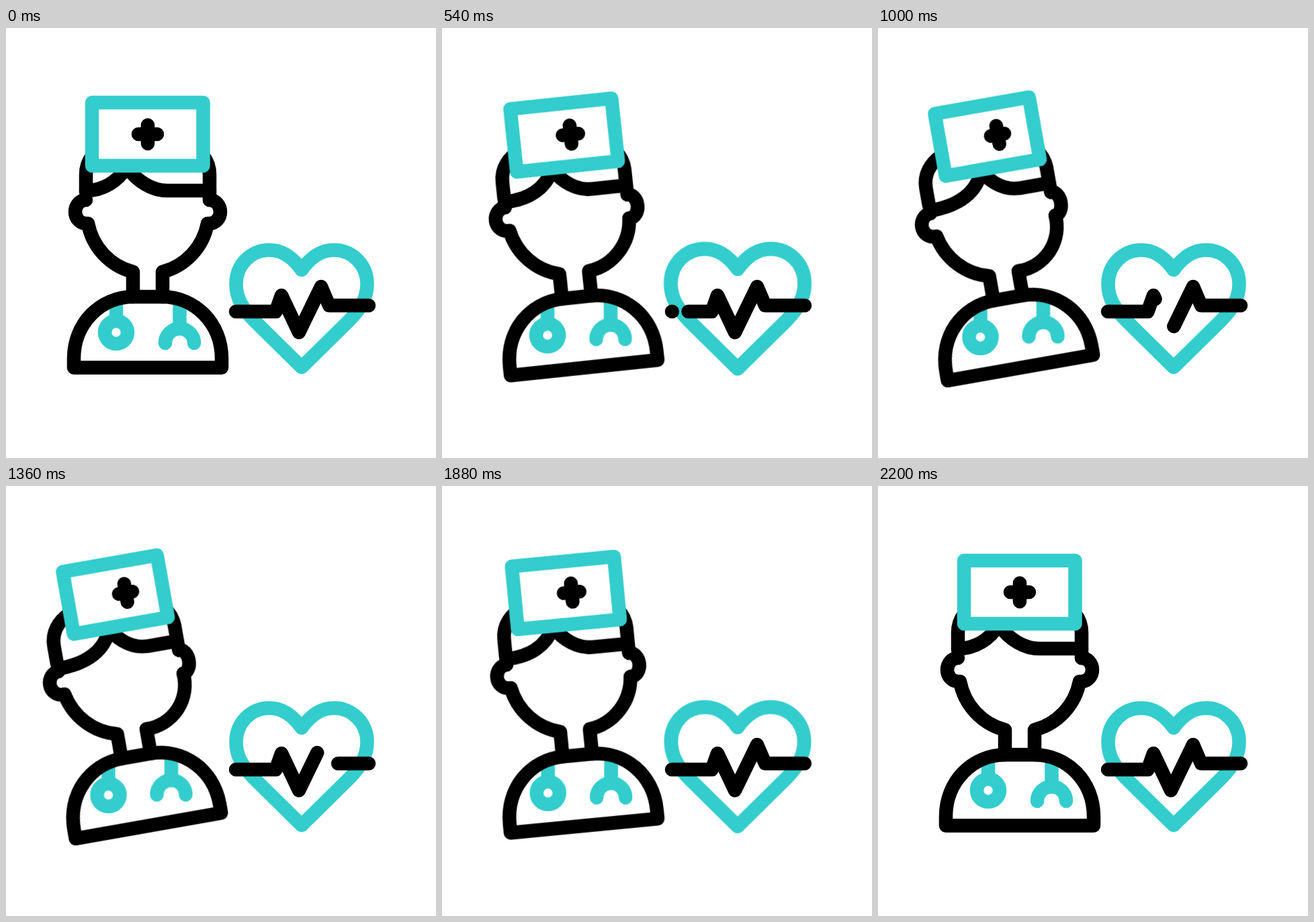
These frames come from a looping animation (640 by 640 pixels, 2400 ms). An HTML page without scripts:

```html
<!DOCTYPE html>
<html lang="en">
<head>
<meta charset="utf-8">
<title>Nurse and heartbeat</title>
<style>
  html, body { margin: 0; width: 100%; height: 100%; overflow: hidden; background: #fff; }
  svg { display: block; width: 100%; height: 100%; }
  path { fill: none; stroke: #000; stroke-width: 20.5; stroke-linecap: round; stroke-linejoin: round; }
  .teal { stroke: #33cdcd; }
  .hat { fill: #fff; }

  .move, .morph, .heart, .pulse {
    animation: 2400ms cubic-bezier(.333, 0, .667, 1) infinite;
  }
  .move { animation-name: move; transform-origin: 213px 500px; }
  .morph { d: var(--rest); animation-name: morph; }
  .heart { animation-name: beat; transform-origin: 440px 418px; }

  /* Lean out 200-800 ms, return 1600-2200 ms */
  @keyframes move {
    0%, 8.333%, 91.667%, 100% { transform: none; }
    33.333%, 66.667% { transform: var(--to); }
  }
  @keyframes morph {
    0%, 8.333%, 91.667%, 100% { d: var(--rest); }
    33.333%, 66.667% { d: var(--turn); }
  }
  @keyframes beat {
    0%, 16.667%, 41.667%, 58.333%, 83.333%, 100% { transform: scale(1); }
    29.167%, 70.833% { transform: scale(1.047); }
  }

  /* The old trace is wiped from the left while the new one follows */
  .pulse { stroke-dasharray: 100 200; }
  .wipe { animation-name: wipe, show-old; }
  .draw { animation-name: draw, show-new; }
  .wipe, .draw { animation-timing-function: cubic-bezier(.333, 0, .667, 1), step-end; }
  @keyframes wipe {
    0%, 12.5% { stroke-dashoffset: 0; }
    70.833%, 100% { stroke-dashoffset: -100; }
  }
  @keyframes draw {
    0%, 20.833% { stroke-dashoffset: 100; }
    79.167%, 100% { stroke-dashoffset: 0; }
  }
  @keyframes show-old { 0% { opacity: 1; } 70.833%, 100% { opacity: 0; } }
  @keyframes show-new { 0% { opacity: 0; } 20.833%, 100% { opacity: 1; } }
</style>
</head>
<body>
<svg viewBox="0 0 640 640">
  <defs>
    <path id="trace" pathLength="100" d="M342 422H401.5L410 398L436 453L469 385L481 413H540"/>
  </defs>

  <!-- stethoscope -->
  <g class="move" style="--to: translate(-11.5px, 7px)">
    <path class="teal" d="M164 413V436M147 453a17 17 0 1 0 34 0a17 17 0 1 0 -34 0"/>
  </g>
  <g class="move" style="--to: translate(-12.5px, -9.5px)">
    <path class="teal" d="M258.5 413V447M237 469a21.5 21.5 0 0 1 43 0"/>
  </g>

  <g class="move" style="--to: rotate(-10deg)">
    <!-- shoulders -->
    <path d="M101 505.5V492C101 440 140 400 190 400H232C282 400 321 440 321 492V505.5Z"/>
    <!-- face -->
    <path d="M119 256A16 17.5 0 0 0 119 291H122A92 92 0 0 0 189 363V400"/>
    <path class="morph" style="
      --rest: path('M303 256A16 17.5 0 0 1 303 291H300A92 92 0 0 1 233 363V400');
      --turn: path('M302 256A11 17.5 0 0 1 302 291H301.5A66 66 0 0 1 233 363V400')"/>
    <!-- hair -->
    <path d="M119 244V218C119 196 133 182 150 174"/>
    <path class="morph" style="
      --rest: path('M303 256V218C303 196 289 182 272 174');
      --turn: path('M301 256V218C300 196 286 182 269 174')"/>
    <path class="morph" style="
      --rest: path('M119 242C145 242 166 228 180 207C195 228 217 242 240 242H303');
      --turn: path('M119 252C165 252 193 236 204 207C217 228 235 242 257 242H301')"/>
    <!-- hat -->
    <path class="morph teal hat" style="
      --rest: path('M128 111H293.5V205H128Z');
      --turn: path('M151 111H293.5V205H151Z')"/>
    <path class="morph" style="
      --rest: path('M197 158H225M211 144.5V172');
      --turn: path('M227.5 158H248M238 144.5V172')"/>
  </g>

  <g class="heart">
    <path class="teal" d="M440 505L368 434C352 417 342.5 402 342.5 381C342.5 353 364 330.5 392 330.5C412 330.5 428 343 440 360C452 343 468 330.5 488 330.5C516 330.5 537.5 353 537.5 381C537.5 402 528 417 512 434Z"/>
  </g>
  <use class="pulse wipe" href="#trace"/>
  <use class="pulse draw" href="#trace"/>
</svg>
</body>
</html>
```
